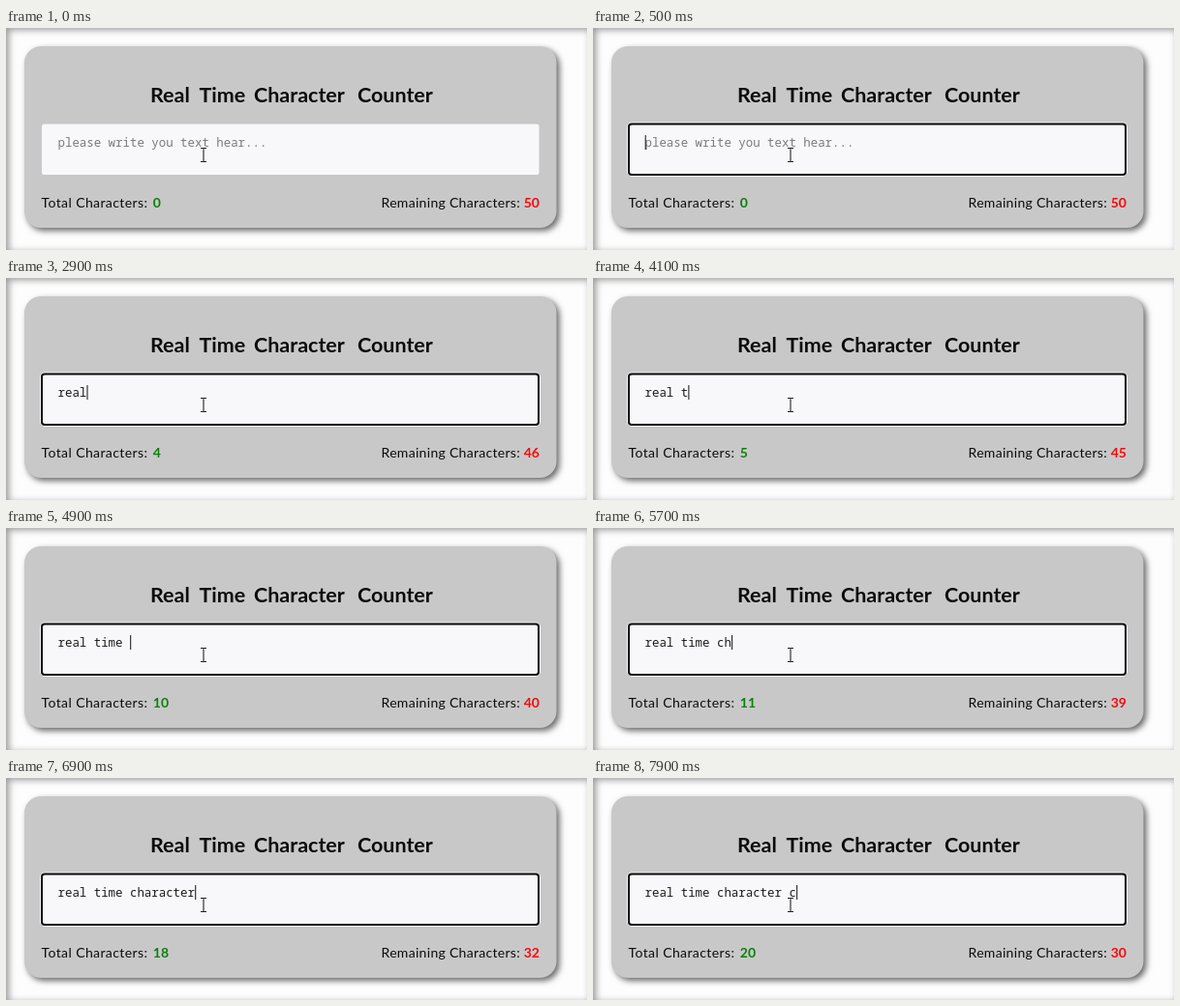
Recreate the animation shown at these times as an HTML page. Size 600 by 230 pixels, loop 8000 ms.

```html
<!DOCTYPE html>
<html lang="en">
<head>
<meta charset="utf-8">
<title>Character counter</title>
<style>
  html, body { margin: 0; width: 100%; height: 100%; overflow: hidden; background: #fefdfe; }
  body { box-shadow: inset 3px 2px 7px #999; }
  svg { display: block; width: 100%; height: 100%; }
  .card { fill: #c9c8c9; filter: drop-shadow(3px 3px 3px #666); }
  .comic { font-family: "Comic Sans MS", Lato, sans-serif; fill: #0b0b0b; }
  .title { font-size: 21.5px; font-weight: 700; }
  .label { font-size: 14px; }
  .num { font-size: 14px; font-weight: 700; }
  .mono { font: 12.42px "Noto Sans Mono", monospace; white-space: pre; }
</style>
</head>
<body>
<svg viewBox="0 0 600 230">
  <rect class="card" x="19" y="19" width="549.5" height="188" rx="17"/>
  <text class="comic title" y="77">
    <tspan x="149">Real</tspan>
    <tspan x="199.5">Time</tspan>
    <tspan x="256">Character</tspan>
    <tspan x="363">Counter</tspan>
  </text>

  <rect x="37" y="99.5" width="513.5" height="52.5" rx="2.5" fill="#f8f7f9"/>
  <g id="focus" fill="none">
    <rect x="35.5" y="98" width="516" height="55.5" rx="4.5" stroke="#f4f4f4"/>
    <rect x="37" y="99.5" width="513" height="52.5" rx="3" stroke="#0c0c10" stroke-width="2"/>
  </g>
  <text id="hint" class="mono" x="53.5" y="123" fill="#7b7b7b">please write you text hear...</text>
  <text id="typed" class="mono" x="53.5" y="123" fill="#1c1c1c"></text>
  <rect id="caret" y="111" width="1" height="15" fill="#111"/>

  <text class="comic label" x="36.5" y="186" letter-spacing=".4">Total Characters:</text>
  <text id="total" class="comic num" x="151.8" y="186" style="fill:#0a800a"></text>
  <text class="comic label" x="531" y="186" text-anchor="end" letter-spacing=".3">Remaining Characters:</text>
  <text id="left" class="comic num" x="551" y="186" text-anchor="end" style="fill:#f60a0a"></text>

  <g fill="none">
    <path id="beam" d="M201 124.5h2.5l.5 .5l.5-.5h2.5M204 125v13M201 138.5h2.5l.5-.5l.5 .5h2.5" stroke="#222" stroke-width="1.1"/>
  </g>
</svg>
<script>
  const LOOP = 8000, LIMIT = 50, FOCUS = 500, PITCH = 7.45;
  const TEXT = "real time character c";
  // Moment each character is typed
  const KEYS = [2000, 2100, 2300, 2800, 3100, 4100, 4300, 4500, 4600, 4800,
    5300, 5700, 5900, 6200, 6200, 6400, 6600, 6800, 6900, 7200, 7900];
  // The counter follows on key release; these keys are released at once
  const QUICK = [2, 13];
  const el = id => document.getElementById(id);
  const show = (id, on) => el(id).setAttribute("visibility", on ? "visible" : "hidden");

  function draw(t) {
    const typed = KEYS.filter(k => k <= t).length;
    const count = KEYS.filter((k, i) => k + (QUICK.includes(i) ? 0 : 100) <= t).length;
    const idle = t - (typed ? KEYS[typed - 1] : FOCUS);

    show("focus", t >= FOCUS);
    show("hint", !typed);
    show("caret", t >= FOCUS && (idle < 500 || idle >= 1100));
    el("caret").setAttribute("x", 53.7 + typed * PITCH);
    el("typed").textContent = TEXT.slice(0, typed);
    el("total").textContent = count;
    el("left").textContent = LIMIT - count;
  }

  const start = performance.now();
  function tick() {
    draw((performance.now() - start) % LOOP);
    requestAnimationFrame(tick);
  }
  draw(0);
  requestAnimationFrame(tick);
</script>
</body>
</html>
```
